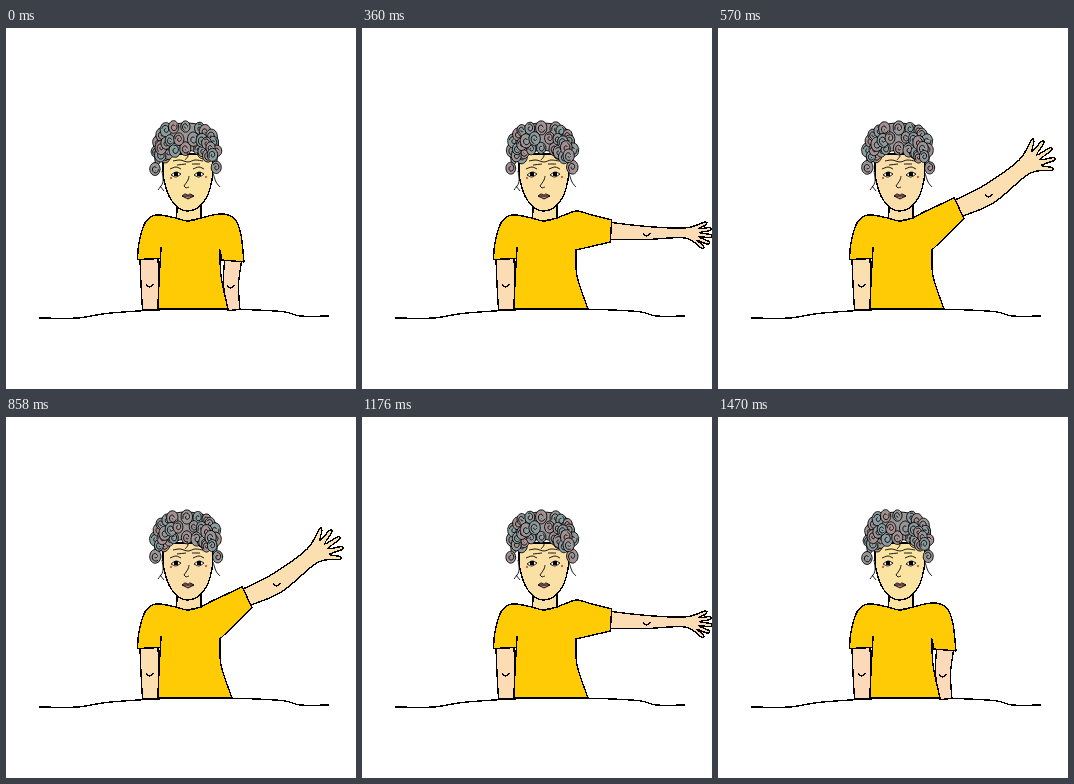
Write an HTML page that moves like this. It is 350 px wide and 361 px high and loops after 1500 ms.

```html
<!DOCTYPE html>
<html lang="en">
<head>
<meta charset="utf-8">
<title>Waving</title>
<style>
  html, body { margin: 0; height: 100%; overflow: hidden; background: #fff; }
  svg { display: block; width: 100%; height: 100%; fill: none; stroke: #000; stroke-width: 1.4; stroke-linejoin: round; }
  .thin { stroke-width: .9; }
</style>
</head>
<body>
<svg id="stage" viewBox="0 0 350 361" shape-rendering="crispEdges"></svg>
<script>
const { sin, cos, atan2, abs, sign, PI } = Math;
const points = p => typeof p === 'string' ? p.split(' ').map(s => s.split(',').map(Number)) : p;
const range = (n, f) => Array.from({ length: n }, (_, i) => f(i));
const polar = ([x, y], a, r) => [x + r * cos(a), y + r * sin(a)];

// Smooth curve through points; several parts join at sharp corners.
function curve(parts) {
  return parts.map((part, n) => {
    const p = points(part);
    let d = (n ? 'L' : 'M') + p[0];
    for (let i = 0; i < p.length - 1; i++) {
      const a = p[i - 1] || p[i], b = p[i], c = p[i + 1], e = p[i + 2] || c;
      const near = k => b[k] + (c[k] - a[k]) / 6;
      const far = k => c[k] - (e[k] - b[k]) / 6;
      d += `C${near(0)},${near(1)} ${far(0)},${far(1)} ${c}`;
    }
    return d;
  }).join('');
}
const line = (...parts) => `<path d="${curve(parts)}"/>`;
const shape = (fill, ...parts) => `<path fill="${fill}" d="${curve(parts)}Z"/>`;
const dot = (x, y, r, fill) => `<circle cx="${x}" cy="${y}" r="${r}" fill="${fill}" stroke="none"/>`;

// Both sides of a limb at joint i, widened by extra.
function edges(joints, i, extra = 0) {
  const from = joints[i - 1] || joints[i], to = joints[i + 1] || joints[i];
  const a = atan2(to[1] - from[1], to[0] - from[0]), r = (joints[i][2] + extra) / 2;
  return [polar(joints[i], a - PI / 2, r), polar(joints[i], a + PI / 2, r)];
}

// Five fingers fanned around the wrist.
function fingers(wrist, { dir, spread, size }) {
  return range(5, i => {
    const a = (dir + (i - 2) * spread) * PI / 180, gap = spread * PI / 360;
    const reach = size * (1 - .035 * (i - 2) ** 2), tip = polar(wrist, a, reach);
    const finger = [polar(tip, a - PI / 2, 1.5), polar(tip, a + PI / 2, 1.5)];
    return i < 4 ? [...finger, polar(wrist, a + gap, size * .55)] : finger;
  }).flat();
}

function arm(joints, skin, hand) {
  const sides = joints.map((_, i) => edges(joints, i));
  const top = sides.map(s => s[0]), under = sides.map(s => s[1]).reverse();
  const [x, y] = joints[1];
  const outline = hand ? [[...top, ...fingers(joints.at(-1), hand), ...under]] : [top, under];
  return shape(skin, ...outline) + line([[x - 4, y + 1], [x, y + 3], [x + 4, y]]);
}

function curl(x, y, r, i) {
  const at = k => [x + .88 * r * cos(i * 2.4 + k), y + 1.08 * r * sin(i * 2.4 + k)];
  const coil = range(11, k => {
    const [px, py] = at(k * PI / 4), s = .72 - k * .06;
    return [x + (px - x) * s, y + (py - y) * s];
  });
  return shape(['#999698', '#8b9b9e', '#a39092'][i % 3], range(9, k => at(k * PI / 4))) +
    line(coil) + dot(x + 1, y, 1, i % 2 ? '#c98e90' : '#79aaae');
}

// Curls sit on three boxy arcs, one inside the other.
function hair(seed) {
  const boxy = v => sign(v) * abs(v) ** .65;
  const ring = k => range(13 - 3 * k, i => {
    const start = .25 * k, a = start + (PI - 2 * start) * i / (12 - 3 * k), n = i + 13 * k + seed;
    return curl(180 - (31 - 4 * k) * boxy(cos(a)) + sin(n * 3) * .8,
      140 - (41 - 11 * k) * boxy(sin(a)) + cos(n * 7), 6 + sin(n * 5) * .7, n);
  }).join('');
  return shape('#999698', '150,140 148,112 160,99 180,95 201,99 212,112 210,140', '205,130 180,122 157,130') +
    ring(0) + ring(2) + ring(1);
}

function eye(x, y) {
  return shape('#fff', [[x - 5, y + 1], [x, y - 2], [x + 5, y]], [[x + 5, y], [x, y + 3], [x - 5, y + 1]]) +
    dot(x, y, 2.4, '#000') + line([[x - 6, y - 5], [x, y - 7], [x + 5, y - 5]]);
}

function head(skin, seed) {
  return shape(skin, '171,174 171,183 170,191', '182,193', '195,190 195,174') +
    shape(skin, '157,126 158,152 166,173 181,183 197,175 206,152 206,126') +
    '<g class="thin">' +
    line('167,133 174,132 182,134 189,132 197,133') + line('171,137 180,136') + line('186,136 194,136') +
    eye(170, 146) + eye(193, 146) + dot(165, 150, 1, '#d65c50') + dot(200, 149, 1, '#d65c50') +
    line('183,148 182,152 178,158', '180,160 183,159') +
    shape('#bd7d80', '176,168 179,166 182,167 184,166 188,168', '182,171 176,168') + line('176,168 188,168') +
    line('156,143 157,154 152,162') + line('154,158 158,163') + line('207,145 210,154 214,159') +
    hair(seed) + line('181,124 182,128 179,132') + line('191,124 193,129 197,131') + '</g>';
}

const LEFT_ARM = points('143,231,18 144,256,18 144,282,15');

// Joints are x, y and width from sleeve to wrist.
const POSES = [
  { face: '#fbe4a2', skin: '#fcd9b8', shoulder: '207,187 218,186 229,191 235,207', hip: 222,
    joints: '227,233,17 225,257,15 228,282,12' },
  { face: '#fadcae', skin: '#fbd9b4', shoulder: '207,187 224,188 240,201', hip: 226,
    joints: '243,224,18 264,243,15 284,262,12 297,270,11', hand: { dir: 41, spread: 16, size: 22 } },
  { face: '#fbe0a6', skin: '#fcdcb4', shoulder: '205,186 215,183 230,187', hip: 226,
    joints: '249,203,17 285,205,13 323,205,10', hand: { dir: 7, spread: 16, size: 26 } },
  { face: '#fbdfab', skin: '#fcdfb0', shoulder: '206,184 219,178', hip: 226,
    joints: '241,180,18 271,166,20 306,139,17', hand: { dir: -34, spread: 19, size: 32 } }
];

function shirt(joints, shoulder, hip) {
  const [out, inner] = edges(joints, 0, 5), [leftInner, leftOut] = edges(LEFT_ARM, 0, 5);
  return shape('#fecb05',
    [[195, 190], ...points(shoulder), out], [inner],
    [[214, 222], [215, 248], [hip, 281]],
    '152,281 153,255 155,220', [leftInner],
    [leftOut, ...points('133,215 139,195 150,187 170,190')], '170,190 182,193 195,190');
}

function figure({ face, skin, shoulder, hip, joints, hand }, seed) {
  const limb = points(joints);
  return '<g>' + line('33,290 72,290 105,285 180,281 270,283 294,288 323,288') +
    arm(LEFT_ARM, skin) + arm(limb, skin, hand) + head(face, seed) + shirt(limb, shoulder, hip) + '</g>';
}

const stage = document.getElementById('stage');
stage.innerHTML = POSES.map(figure).join('');
const figures = [...stage.children];

// The arm steps up to the top pose by 570 ms, rests, and steps down from 1050 ms.
function poseAt(t) {
  const step = t < 810 ? Math.floor((t + 60) / 210) : Math.ceil((1470 - t) / 210);
  return Math.max(0, Math.min(3, step));
}

function draw() {
  const pose = poseAt(performance.now() % 1500);
  figures.forEach((g, i) => g.style.display = i === pose ? '' : 'none');
  requestAnimationFrame(draw);
}
draw();
</script>
</body>
</html>
```
